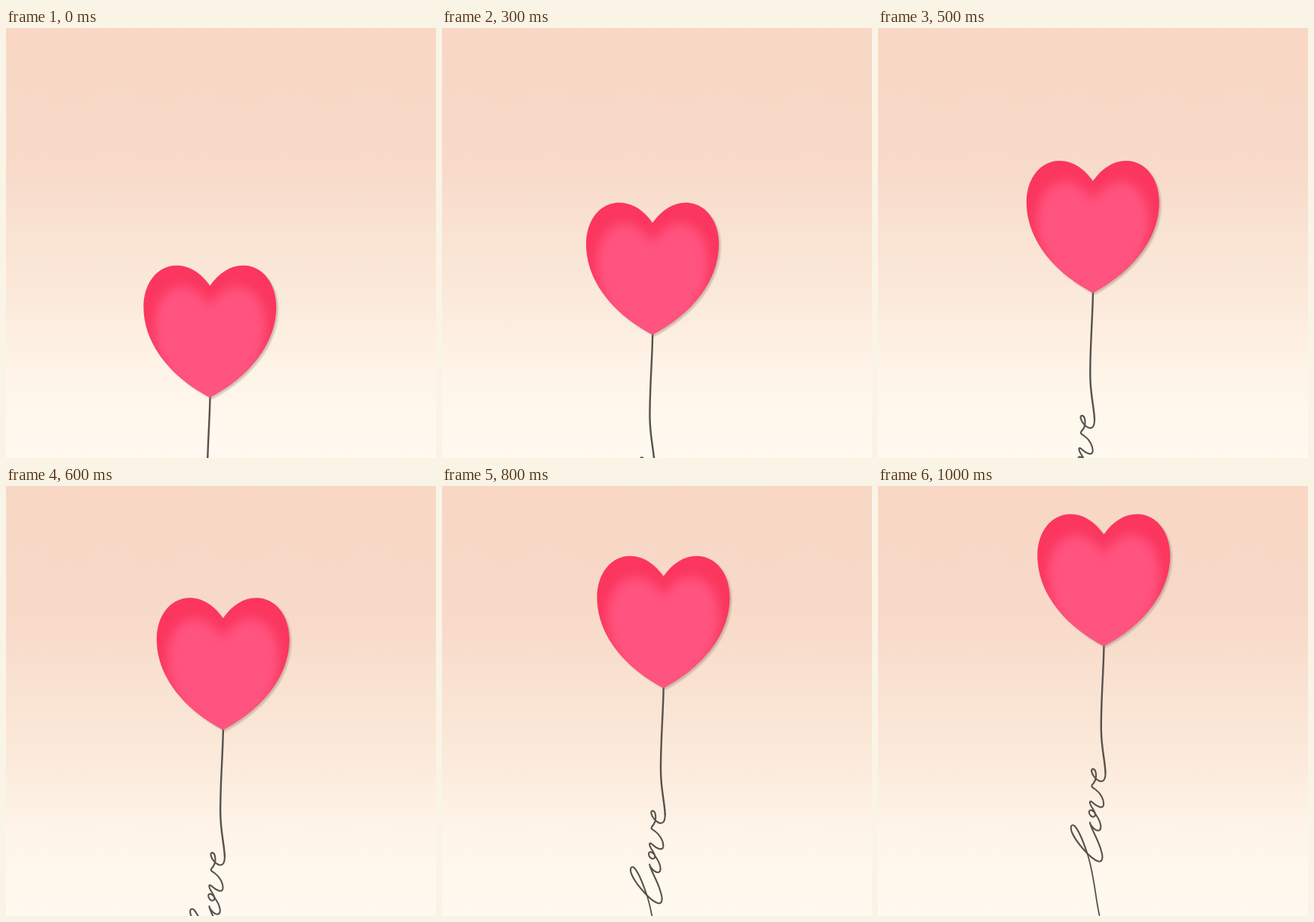
Animation of 570x570 px, one loop 1500 ms. Source, as an HTML page:

```html
<!DOCTYPE html>
<html lang="en">
<head>
<meta charset="utf-8">
<title>Love balloon</title>
<style>
  html, body { margin: 0; width: 100%; height: 100%; overflow: hidden; }
  svg { display: block; width: 100vw; height: 100vh; }
  .thread { fill: none; stroke: #57524d; stroke-linecap: round; stroke-linejoin: round; }
</style>
</head>
<body>
<svg viewBox="0 0 570 570">
  <defs>
    <linearGradient id="sky" x2="0" y2="1">
      <stop offset="0" stop-color="#f8d7c5"/>
      <stop offset=".22" stop-color="#f8d8c6"/>
      <stop offset=".34" stop-color="#f8dbca"/>
      <stop offset=".46" stop-color="#f9e2d2"/>
      <stop offset=".62" stop-color="#fbe9da"/>
      <stop offset=".78" stop-color="#fef3e6"/>
      <stop offset=".9" stop-color="#fff8ed"/>
      <stop offset="1" stop-color="#fff9ef"/>
    </linearGradient>
    <path id="heart" d="M0-148C-12-165-27-175-44-175C-70-175-88-151-88-120C-88-72-53-28 0 0C53-28 88-72 88-120C88-151 70-175 44-175C27-175 12-165 0-148Z"/>
    <clipPath id="inside"><use href="#heart"/></clipPath>
    <filter id="glow" x="-30%" y="-30%" width="160%" height="160%" color-interpolation-filters="sRGB">
      <feGaussianBlur stdDeviation="8"/>
    </filter>
    <filter id="soft"><feGaussianBlur stdDeviation=".8"/></filter>
  </defs>
  <rect width="570" height="570" fill="url(#sky)"/>
  <g id="balloon">
    <path class="thread" stroke-width="2.4" d="M299.5 211C299 245 295.5 285 295.8 322C296 348 301 364 301.5 380"/>
    <!-- handwritten "love", from the e down to the l -->
    <path class="thread" stroke-width="2.1" d="M301.5 380C301.5 389 299 392 295 391.5C289 390 284 383 283 378C283 374 287 374 288.5 379C290 386 288 392 284 396C282 399 285 400 288 402C295 407 300 416 299 423C298 429 289 424 285 420C280 415 280 420 283 425C286 430 290 435 287 438C284 440 279 436 280 431C281 428 286 430 289 436C296 446 297 455 293 456.5C288 458 281 449 281 446C281 452 292 468 296 484C299 493 297 499 292 497.5C281 494 262 471 257 459C254 451 257 447 261 451C267 458 273 474 277 486"/>
    <path class="thread" stroke-width="1.8" d="M277 486C286 511 288 545 293.5 569"/>
    <g transform="translate(299.3 212.2)">
      <use href="#heart" x="2.5" y="2.5" fill="#8c7868" opacity=".4" filter="url(#soft)"/>
      <use href="#heart" fill="#fb365f"/>
      <g clip-path="url(#inside)">
        <use href="#heart" transform="translate(0 19) scale(.84 .95)" fill="#ff547f" filter="url(#glow)"/>
      </g>
    </g>
  </g>
</svg>
<script>
  const LOOP = 1500, STEP = 100, STEPS = 10;
  const balloon = document.getElementById('balloon');

  function draw(now) {
    const left = STEPS - Math.min(STEPS, Math.floor(now % LOOP / STEP));
    balloon.setAttribute('transform', `translate(${-2.9 * left} ${27.75 * left})`);
    requestAnimationFrame(draw);
  }
  draw(0);
</script>
</body>
</html>
```
